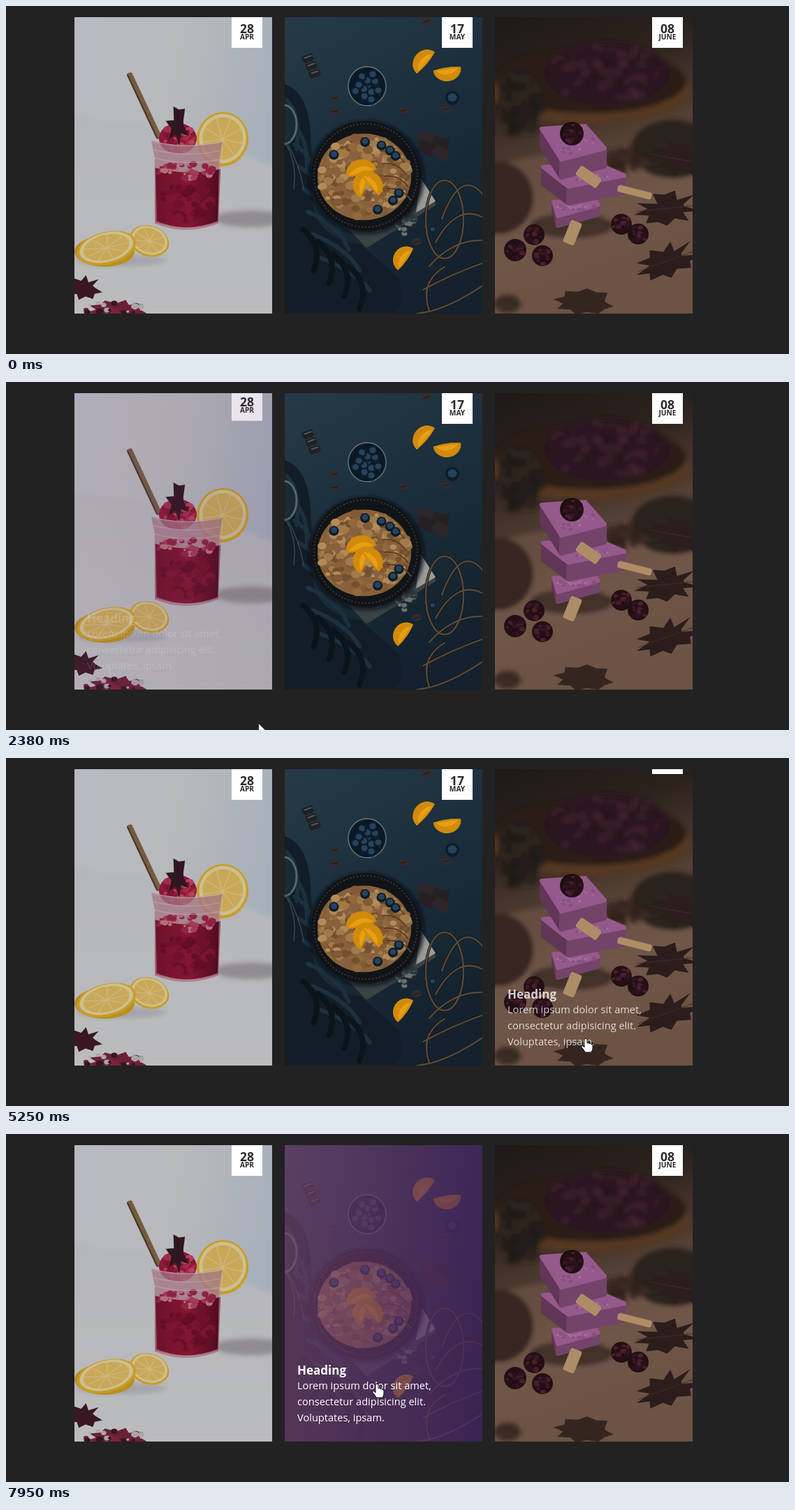
Animation, 1121 px wide and 499 px high, one loop 8 s. Source, as an HTML page:

```html
<!DOCTYPE html>
<html lang="en">
<head>
<meta charset="utf-8">
<title>Hover cards</title>
<style>
html, body { margin: 0; width: 100%; height: 100%; overflow: hidden; background: #222; }
svg { position: absolute; width: 283px; height: 425px; top: 16px; overflow: hidden; }
text { font: 14.6px "Open Sans", "Noto Sans", sans-serif; fill: #fff; }
.head { font-weight: 700; font-size: 17px; }
.day, .month { font-weight: 700; font-size: 17.5px; fill: #2a2a2a; text-anchor: middle; }
.month { font-size: 10.2px; }
#cursor { left: 0; top: 0; width: 1121px; height: 499px; }
#cursor path { fill: #fff; stroke: #111; stroke-linejoin: round; }
</style>
</head>
<body>
<script>
let seed = 7;
const rnd = () => (seed = seed * 16807 % 2147483647) / 2147483647;
const pick = list => list[Math.floor(rnd() * list.length)];
const loop = (n, draw) => Array.from({ length: n }, (_, i) => draw(i)).join('');
const soft = 'filter="url(#soft)"';

// Shapes in stage coordinates
const path = (d, fill, more = '') => `<path d="${d}" fill="${fill}" ${more}/>`;
const line = (d, stroke, w, more = '') => path(d, 'none', `stroke="${stroke}" stroke-width="${w}" stroke-linecap="round" ${more}`);
const oval = (x, y, rx, ry, fill, more = '') => `<ellipse cx="${x}" cy="${y}" rx="${rx}" ry="${ry}" fill="${fill}" ${more}/>`;
const turned = (x, y, turn, inner) => `<g transform="translate(${x} ${y}) rotate(${turn})">${inner}</g>`;
const slab = (x, y, w, h, turn, fill) =>
  turned(x, y, turn, `<rect x="${-w / 2}" y="${-h / 2}" width="${w}" height="${h}" rx="3" fill="${fill}"/>`);
const dots = (n, x, y, rx, ry, r, fills) => loop(n, () => {
  const a = rnd() * 6.283, q = Math.sqrt(rnd()), s = r * (.5 + rnd());
  return oval(x + rx * q * Math.cos(a), y + ry * q * Math.sin(a), s, s * .8, pick(fills));
});
// Closed outline whose radius jumps in and out
const jagged = (x, y, rx, ry, n, fill, depth = .4) => {
  const points = Array.from({ length: n }, (_, i) => {
    const a = i * 6.283 / n, q = i % 2 ? 1 : 1 - depth * (.5 + rnd());
    return [x + rx * q * Math.cos(a), y + ry * q * Math.sin(a)];
  });
  return path(`M${points.join('L')}Z`, fill);
};
const ramp = (id, x2, y2, ...stops) => `<linearGradient id="${id}" x2="${x2}" y2="${y2}">` +
  stops.map((c, i) => `<stop offset="${i / (stops.length - 1)}" stop-color="${c}"/>`).join('') + '</linearGradient>';
const back = (x, fill) => `<rect x="${x}" y="16" width="283" height="425" fill="${fill}"/>`;

const lemon = (x, y, rx, ry, turn) => turned(x, y, turn,
  oval(0, 0, rx, ry, '#c99c2a') + oval(0, -1, rx * .91, ry * .91, '#cdc08f') + oval(0, -1, rx * .78, ry * .78, '#c9a859') +
  line(loop(9, i => `M0 0L${rx * .76 * Math.cos(i * .698)} ${ry * .76 * Math.sin(i * .698)}`), '#cfb983', 1.2));
const orange = (x, y, turn, w = 20, h = 18) => turned(x, y, turn,
  path(`M${-w} 4A${w} ${h} 0 0 1 ${w} 4Q0 8 ${-w} 4`, '#d28a0c') + path(`M${4 - w} 3A${w} ${h} 0 0 1 ${w - 4} 3Z`, '#e6a014'));
const blueberry = (x, y, r = 7) => oval(x, y, r, r, '#0e1c2c') + oval(x, y - 1, r * .65, r * .6, '#25435d');
const blackberry = (x, y, r) => oval(x, y, r, r, '#210f14') +
  dots(24, x, y, r * .8, r * .8, r * .18, ['#341520', '#4a1e2b', '#27111a']);
const bean = (x, y) => oval(x, y, 7, 5, '#352c2b') + line(`M${x - 4} ${y + 1}l8 -2`, '#181415', 1.2);

const drink = () => ramp('wall', 1, .35, '#b6bac3', '#b8b9bb', '#a6afbb') + ramp('floor', 0, 1, '#b5b6ba', '#bbbcbe') +
  ramp('juice', 1, 0, '#6b1129', '#861633', '#4f0b20') + back(98, 'url(#wall)') +
  path('M90 160Q220 165 390 232V450H90Z', 'url(#floor)', soft) +
  oval(350, 305, 52, 12, '#908c8f', soft) + oval(165, 365, 65, 8, '#a5a5a9', soft) +
  slab(198, 143, 8, 104, -25, '#765b40') + slab(195, 144, 2, 102, -25, '#43352b') +
  lemon(310, 191, 37, 39, 12) +
  oval(246, 190, 27, 22, '#8c1937') + dots(50, 246, 190, 24, 19, 4, ['#a32a48', '#7d1532', '#b2405a']) +
  jagged(246, 172, 18, 30, 13, '#301620') +
  path('M208 193Q258 206 310 195L306 216 304 312Q258 330 213 312V218Z', '#a37583', 'opacity=".75"') +
  path('M213 232Q260 244 307 234L304 310Q258 326 214 310Z', 'url(#juice)') +
  dots(50, 259, 236, 42, 11, 4, ['#a23d57', '#b56f7f', '#8c2341']) +
  dots(45, 258, 282, 38, 28, 6, ['#701129', '#7b1530', '#640e26']) +
  line(loop(3, i => `M${209 + i * 2} ${194 + i * 12}q48 12 98 1`), '#c2a7af', 1.5, 'opacity=".6"') +
  line('M213 222L215 309Q258 327 304 309L306 222', '#bd8b99', 1.5, 'opacity=".7"') +
  lemon(205, 337, 29, 22, 18) + oval(141, 352, 43, 22, '#ba8f20') + lemon(144, 347, 43, 23, -14) +
  jagged(112, 404, 28, 18, 17, '#3a1722') + jagged(160, 437, 46, 16, 19, '#6a2035') +
  dots(26, 150, 436, 48, 12, 4, ['#36151f', '#7b233a', '#aaa5aa']);

const pan = () => ramp('slate', .4, 1, '#263a47', '#1b2e3c', '#13222e') + back(399, 'url(#slate)') +
  path('M399 112Q433 124 436 182L440 288Q450 335 508 342L563 391Q575 440 545 441H399Z', '#121d28') +
  line(loop(8, i => `M${402 + i * 6} ${135 + i * 32}q${20 + i * 5} 20 ${14 + i * 9} ${70 - i * 3}`), '#1c303e', 6) +
  line(loop(4, i => `M${425 + i * 22} ${320 + i * 18}q30 25 15 60`), '#0b141d', 8) +
  oval(398, 170, 18, 28, '#1a2a32', 'stroke="#53666d" stroke-width="3"') +
  line(loop(2, i => `M${402 - i * 2} 196q18 30 ${24 - i * 12} 66`), '#4d5656', 1) +
  path('M589 243L616 285 516 347 488 317Z', '#3a4344') + path('M594 247L615 280 587 296Z', '#9a9c99') +
  dots(45, 555, 312, 40, 16, 3, ['#1f282b', '#677070', '#2e373a']) +
  oval(516, 246, 82, 80, '#0a1015', soft) + oval(515, 243, 78, 78, '#111416') +
  oval(515, 243, 74, 74, 'none', 'stroke="#34383a" stroke-width="2" stroke-dasharray="2 3"') +
  oval(513, 245, 67, 62, '#87613b') +
  dots(220, 513, 245, 64, 58, 5, ['#92693f', '#a07a4b', '#73502f', '#b18b59', '#825a34']) +
  line(loop(4, i => `M${536 + i * 3} ${208 + i * 18}q22 -2 34 16`), '#5c4226', 2) +
  orange(508, 236, -15, 22, 20) + orange(511, 254, -70) + orange(524, 254, 50) +
  [-141, -89, -64, -49, -37, 28, 43, 70].map(a => blueberry(513 + 56 * Math.cos(a / 57.3), 245 + 50 * Math.sin(a / 57.3))).join('') +
  oval(517, 115, 27, 28, '#0d1822', 'stroke="#5f7680" stroke-width="1.5"') +
  loop(12, i => blueberry(517 + 6 * Math.sqrt(i) * Math.cos(i * 2.4), 116 + 6 * Math.sqrt(i) * Math.sin(i * 2.4))) +
  orange(598, 79, -50) + orange(632, 94, 172) + orange(569, 361, -55, 19) +
  blueberry(639, 132, 10) + blueberry(611, 321, 5) +
  [[602, 22], [470, 132], [471, 151], [569, 150], [630, 148], [588, 338]].map(p => bean(...p)).join('') +
  loop(3, i => slab(432 + i * 5, 75 + i * 11, 16, 10, -20, '#211f23') + slab(432 + i * 5, 73 + i * 11, 12, 2, -20, '#57565a')) +
  loop(4, i => slab(602 + i % 2 * 20, 190 + i * 7, 24, 17, i * 12, pick(['#1d1a1d', '#2c2628', '#252022']))) +
  [['#14120f', 4], ['#57483a', 2.5]].map(([color, w]) => oval(628, 306, 27, 56, 'none', `stroke="${color}" stroke-width="${w}"`) +
    line(loop(5, i => `M${588 + i * 9} ${441 - i * 34}Q${628 + i * 6} ${438 - i * 52} 684 ${400 - i * 32}`) + 'M606 437Q592 395 628 374', color, w)).join('');

const leaf = (x, y, turn) => turned(x, y, turn, jagged(0, 0, 50, 25, 19, '#2a1d1c') + line('M-45 0H45', '#3f2d28', 1));
const stick = (x, y, length, w, turn) => slab(x, y, length, w, turn, '#ae8c66');
const block = (x, y, w, dx, dy, h) => {
  const face = (d, fill) => path(d, fill, `stroke="${fill}" stroke-width="6" stroke-linejoin="round"`);
  return face(`M${x} ${y}l${dx} ${dy + 12}v${h}l${-dx} ${-dy - 12}Z`, '#603555') +
    face(`M${x + dx} ${y + dy + 12}l${w} -16v${h}l${-w} 16Z`, '#74436a') +
    face(`M${x} ${y}l${w} -4 ${dx} ${dy} ${-w} 16Z`, '#96598b') +
    dots(30, x + (w + dx) / 2, y + dy / 2 + 4, w / 2, dy / 2, 2, ['#a56a99', '#86507c']);
};
const ices = () => ramp('wood', .25, 1, '#1f1917', '#2b211d', '#4f3c31', '#715848', '#69503f') + back(700, 'url(#wood)') +
  `<g ${soft}>` + oval(835, 123, 143, 47, '#553820') + oval(837, 108, 136, 46, '#2a1c19') +
  path('M695 234Q760 203 838 218 930 205 990 243V445H695Z', '#70584a', 'opacity=".6"') +
  oval(705, 275, 50, 52, '#382822') + oval(955, 205, 60, 42, '#2a201c') + oval(810, 315, 60, 18, '#43312b') +
  oval(860, 97, 90, 45, '#2c1820') + dots(110, 860, 97, 85, 40, 6, ['#351b26', '#2c171d', '#42202f', '#26171a']) +
  oval(736, 135, 32, 45, '#241d1a') + dots(60, 736, 140, 34, 45, 6, ['#1f1a18', '#2d241f']) +
  dots(40, 890, 222, 35, 16, 6, ['#3a2922', '#30221d']) + '</g>' +
  leaf(948, 290, -6) + leaf(948, 365, -20) + leaf(965, 220, 10) +
  block(784, 281, 58, 6, 8, 14) + block(769, 231, 80, 36, 16, 24) + block(767, 176, 62, 28, 32, 26) +
  stick(834, 245, 36, 16, 35) + stick(900, 267, 50, 10, 14) + stick(811, 325, 34, 17, 112) +
  [[810, 183, 17], [756, 328, 15], [729, 350, 16], [768, 358, 15], [881, 313, 15], [905, 327, 15]].map(p => blackberry(...p)).join('') +
  jagged(828, 424, 45, 19, 17, '#35251f', .25) + oval(718, 427, 19, 13, '#3a2924', soft);

const badge = (day, month) => `<g class="badge"><rect x="225" width="44" height="44" fill="#fff"/>
  <text class="day" x="247" y="23">${day}</text><text class="month" x="247" y="32">${month}</text></g>`;
const caption = '<g class="caption"><text class="head" x="18" y="329">Heading</text>' +
  ['Lorem ipsum dolor sit amet,', 'consectetur adipisicing elit.', 'Voluptates, ipsam.']
    .map((words, i) => `<text x="18" y="${350 + i * 23}">${words}</text>`).join('') + '</g>';
const tint = `<linearGradient id="tint"><stop stop-color="#774370" stop-opacity=".65"/>
  <stop offset="1" stop-color="#46245c" stop-opacity=".78"/></linearGradient>`;
const softness = '<filter id="soft" x="-30%" y="-30%" width="160%" height="160%"><feGaussianBlur stdDeviation="3"/></filter>';

const cards = [[drink, 28, 'APR'], [pan, 17, 'MAY'], [ices, '08', 'JUNE']];
document.body.innerHTML += cards.map(([photo, day, month], i) => {
  const x = 98 + 301 * i;
  return `<svg style="left:${x}px" viewBox="${x} 16 283 425">${softness}${photo()}</svg>
  <svg style="left:${x}px" viewBox="0 0 283 425">${tint}${badge(day, month)}
  <rect class="veil" width="283" height="425" fill="url(#tint)"/>${caption}</svg>`;
}).join('') + `<svg id="cursor"><g id="pointer">
  <path id="arrow" d="M0 0V17L4 13.2 6.8 19.5 9.6 18.3 6.9 12.2H12.3Z"/>
  <path id="hand" d="M-2 1.5Q0-1.5 2 1.5V7Q4 5.5 5 7.5 7 6.5 7.8 8.5 10 8 10 10V14Q10 17 8 20H-1Q-2 17-6 12.5-6.5 10-4.5 10.5L-2 13Z"/></g></svg>`;

const all = name => [...document.querySelectorAll('.' + name)];
const badges = all('badge'), veils = all('veil'), captions = all('caption');
const [pointer, arrow, hand] = ['pointer', 'arrow', 'hand'].map(id => document.getElementById(id));

// card, time the pointer enters, time it leaves
const hovers = [[0, 470, 2070], [1, 2850, 4150], [2, 4980, 6420], [1, 7370, 9000]];
// time, x, y of the pointer
const route = [[380, 42, 385], [900, 188, 343], [1680, 188, 343], [2380, 361, 489], [2650, 450, 489], [3160, 537, 385],
  [4010, 537, 385], [4320, 559, 486], [4750, 790, 486], [5250, 830, 402], [6300, 830, 402], [6560, 775, 480],
  [7100, 590, 480], [7750, 531, 358], [8000, 531, 358]];

const bez = (u, a, b) => 3 * u * (1 - u) ** 2 * a + 3 * u * u * (1 - u) * b + u ** 3;
// The CSS "ease" curve, solved by bisection
function ease(p) {
  if (p <= 0 || p >= 1) return p <= 0 ? 0 : 1;
  let lo = 0, hi = 1;
  for (let i = 0; i < 16; i++) {
    const mid = (lo + hi) / 2;
    bez(mid, .25, .25) < p ? lo = mid : hi = mid;
  }
  return bez(lo, .1, 1);
}
const level = (card, t, delay, span, lag) => Math.max(0, ...hovers.filter(h => h[0] === card).map(([, enter, leave]) =>
  ease((t - enter - delay) / span) - ease((t - leave - lag) / 500)));

function draw(now) {
  const t = now % 8000;
  cards.forEach((_, i) => {
    badges[i].setAttribute('transform', `translate(0 ${-44 * level(i, t, 0, 500, 0)})`);
    captions[i].setAttribute('opacity', level(i, t, 30, 500, 40));
    veils[i].setAttribute('opacity', level(i, t, 270, 300, 40));
  });
  const k = Math.max(1, route.findIndex(p => p[0] > t));
  const [t0, x0, y0] = route[k - 1], [t1, x1, y1] = route[k], f = (t - t0) / (t1 - t0);
  const inside = hovers.some(h => t >= h[1] && t < h[2]);
  pointer.setAttribute('transform', `translate(${x0 + (x1 - x0) * f} ${y0 + (y1 - y0) * f})`);
  pointer.style.display = t < 380 ? 'none' : '';
  hand.style.display = inside ? '' : 'none';
  arrow.style.display = inside ? 'none' : '';
  requestAnimationFrame(draw);
}
requestAnimationFrame(draw);
</script>
</body>
</html>
```
